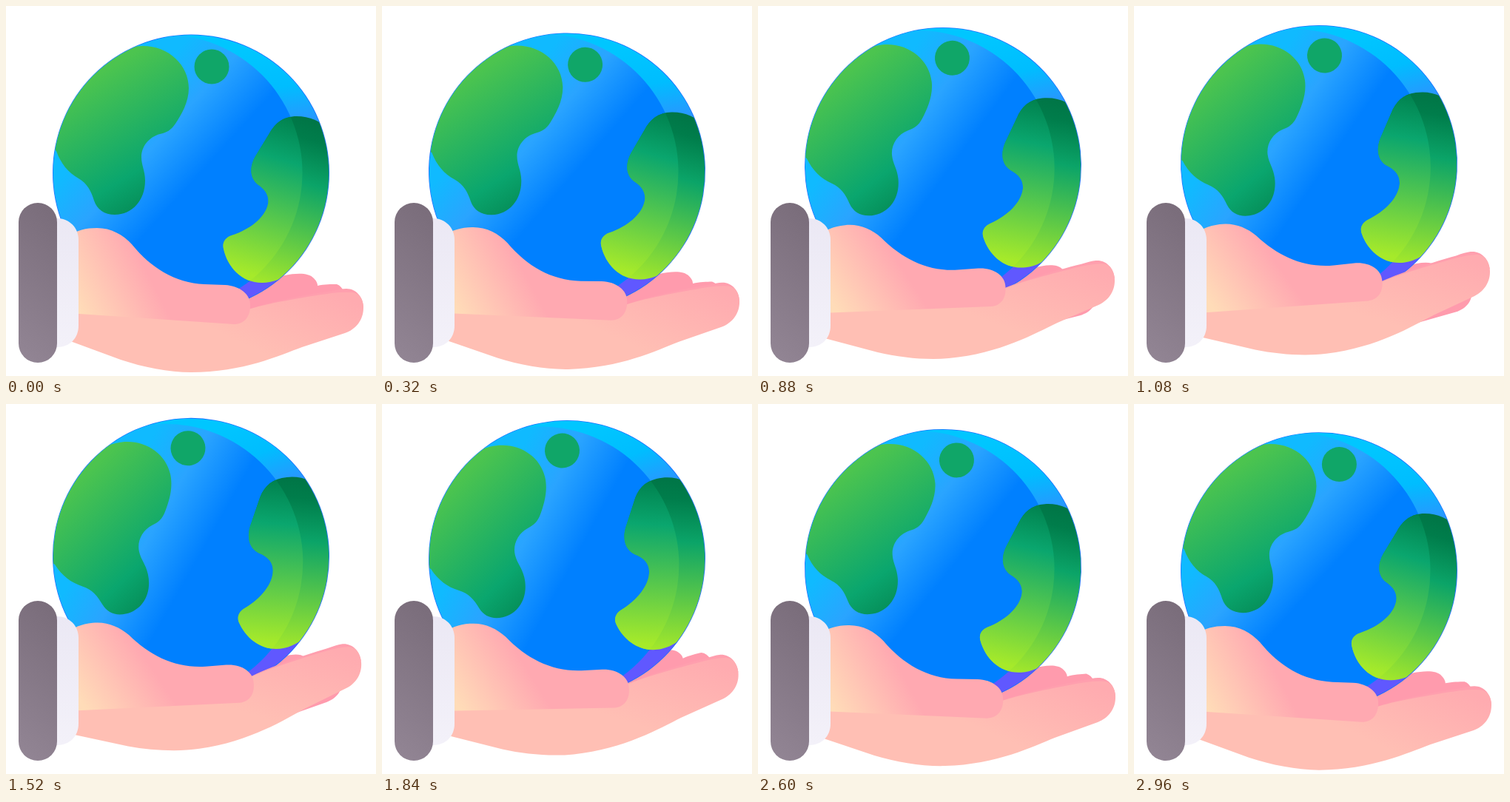
These frames come from a looping animation (500 by 500 pixels, 3 s). An HTML page:

```html
<!DOCTYPE html>
<html lang="en">
<head>
<meta charset="utf-8">
<title>Globe in hand</title>
<style>
html, body { margin: 0; width: 100%; height: 100%; overflow: hidden; background: #fff; }
svg { display: block; width: 100vw; height: 100vh; }
</style>
</head>
<body>
<svg viewBox="0 0 500 500">
  <defs>
    <linearGradient id="sea" gradientUnits="userSpaceOnUse" x1="85" y1="220" x2="185" y2="311">
      <stop offset="0" stop-color="#10baff"/><stop offset=".47" stop-color="#2aa4ff"/><stop offset="1" stop-color="#0080ff"/>
    </linearGradient>
    <linearGradient id="rim" gradientUnits="userSpaceOnUse" x1="340" y1="60" x2="380" y2="370">
      <stop offset="0" stop-color="#00c6ff"/><stop offset=".17" stop-color="#00bdff"/><stop offset=".4" stop-color="#3a86ff"/><stop offset="1" stop-color="#6058ff"/>
    </linearGradient>
    <linearGradient id="west" gradientUnits="userSpaceOnUse" x1="95" y1="110" x2="195" y2="275">
      <stop offset="0" stop-color="#4cc44f"/><stop offset=".72" stop-color="#0aa66e"/><stop offset="1" stop-color="#058a55"/>
    </linearGradient>
    <linearGradient id="east" gradientUnits="userSpaceOnUse" x1="400" y1="150" x2="335" y2="365">
      <stop offset="0" stop-color="#007f4c"/><stop offset=".28" stop-color="#0aa66e"/><stop offset="1" stop-color="#a6ea2a"/>
    </linearGradient>
    <linearGradient id="eastShade" gradientUnits="userSpaceOnUse" x1="405" y1="150" x2="340" y2="372">
      <stop offset="0" stop-color="#007546"/><stop offset=".12" stop-color="#007d4b"/><stop offset=".37" stop-color="#0ba468"/><stop offset="1" stop-color="#a2e72b"/>
    </linearGradient>
    <linearGradient id="palmFill" gradientUnits="userSpaceOnUse" x1="420" y1="375" x2="370" y2="480">
      <stop offset="0" stop-color="#ffabb0"/><stop offset="1" stop-color="#ffbfb4"/>
    </linearGradient>
    <linearGradient id="thumbFill" gradientUnits="userSpaceOnUse" x1="98" y1="410" x2="192" y2="362">
      <stop offset="0" stop-color="#ffdcb8"/><stop offset="1" stop-color="#ffa9b1"/>
    </linearGradient>
    <linearGradient id="sleeve" x1=".6" y1="0" x2=".4" y2="1">
      <stop offset="0" stop-color="#7a6d7b"/><stop offset="1" stop-color="#918493"/>
    </linearGradient>
    <linearGradient id="cuff" x1="0" y1="0" x2="0" y2="1">
      <stop offset="0" stop-color="#ebe8f4"/><stop offset="1" stop-color="#f3f1f9"/>
    </linearGradient>
    <clipPath id="disc"><circle cx="250" cy="225.5" r="186.2"/></clipPath>
    <clipPath id="lit"><circle cx="214" cy="225" r="186.5"/></clipPath>
    <path id="eastLand" d="M446 182C435 160 415 149 393 149C375 149 364 158 356 172L337 203C329 217 329 232 340 241C352 249 356 258 354 268C350 286 330 302 305 310C296 313 292 320 294 328C299 352 318 374 346 374C360 374 375 368 382 362L450 300Z"/>
  </defs>

  <path id="rear" fill="#ff9bad" d="M300 430L330 375L377 364C392 361 409 360 416 368Q421 373 421 378C430 376 440 376 447 376C456 379 460 392 460 405C460 420 450 430 435 433L369 444Z"/>

  <g id="globe">
    <circle cx="250" cy="225.5" r="187" fill="#1a70ff"/>
    <g clip-path="url(#disc)">
      <circle cx="250" cy="225.5" r="187" fill="url(#rim)"/>
      <circle cx="214" cy="225" r="186.5" fill="url(#sea)"/>
      <path fill="url(#west)" d="M50 180C80 100 130 54 185 54C220 54 247 80 247 111C247 130 237 147 229 159C223 168 217 171 208 173C193 177 183 190 183 204C183 216 188 222 188 236C188 262 171 282 147 282C133 282 123 275 119 263C115 250 110 240 98 233C84 225 74 213 68 196Z"/>
      <circle cx="278" cy="82" r="23.5" fill="#10a668"/>
      <use href="#eastLand" fill="url(#eastShade)"/>
      <g clip-path="url(#lit)"><use href="#eastLand" fill="url(#east)"/></g>
    </g>
  </g>

  <g id="palm">
    <path fill="#ff9fae" d="M325 411C350 401 400 391 440 385Q453 382 460 382C473 382 483 393 483 408L440 425H325Z"/>
    <path fill="url(#palmFill)" d="M60 443L155 478C185 488 220 495 250 495C320 495 370 472 400 461L458 442C473 437 483 424 483 408C483 397 478 388 468 387Q456 386 440 388C400 394 350 402 325 411L200 405L85 405Z"/>
  </g>
  <path id="thumb" fill="url(#thumbFill)" d="M84 311C96 303 108 300 123 300C142 300 158 309 170 322C196 354 228 374 268 376L296 377C316 378 331 390 330 405C330 420 322 430 308 430L84 415Z"/>
  <path fill="url(#cuff)" d="M60 287H69C86 287 98 300 98 316V432C98 449 86 461 69 461H60Z"/>
  <rect x="17" y="266" width="52" height="216" rx="26" fill="url(#sleeve)"/>
</svg>
<script>
const LOOP = 3000, STEP = 40, REST = 100, SOFTNESS = 1.2;
const place = (id, transform) => document.getElementById(id).setAttribute('transform', transform);
const turn = (angle, x, y) => `rotate(${-angle} ${x} ${y})`;

// Rises from rest to its size at the peak time, then falls back by the end of the loop.
function swing(t, peak, size) {
  const u = t < peak ? Math.max(0, t - REST) / (peak - REST) : (LOOP - t) / (LOOP - peak);
  return size * u ** SOFTNESS;
}

// The push travels from the thumb through the fingers to the globe, so each part peaks later.
function render(t) {
  place('thumb', turn(swing(t, 1150, 8.6), 84, 350));
  place('palm', turn(swing(t, 1340, 9.3), 50, 400));
  place('rear', turn(swing(t, 1840, 12.7), 260, 425));
  place('globe', `translate(0 ${-swing(t, 1590, 20.8)}) ${turn(swing(t, 1740, 15), 250, 225.5)}`);
}

const start = performance.now();
function frame() {
  const t = (performance.now() - start) % LOOP;
  render(Math.floor(t / STEP) * STEP);
  requestAnimationFrame(frame);
}
frame();
</script>
</body>
</html>
```
